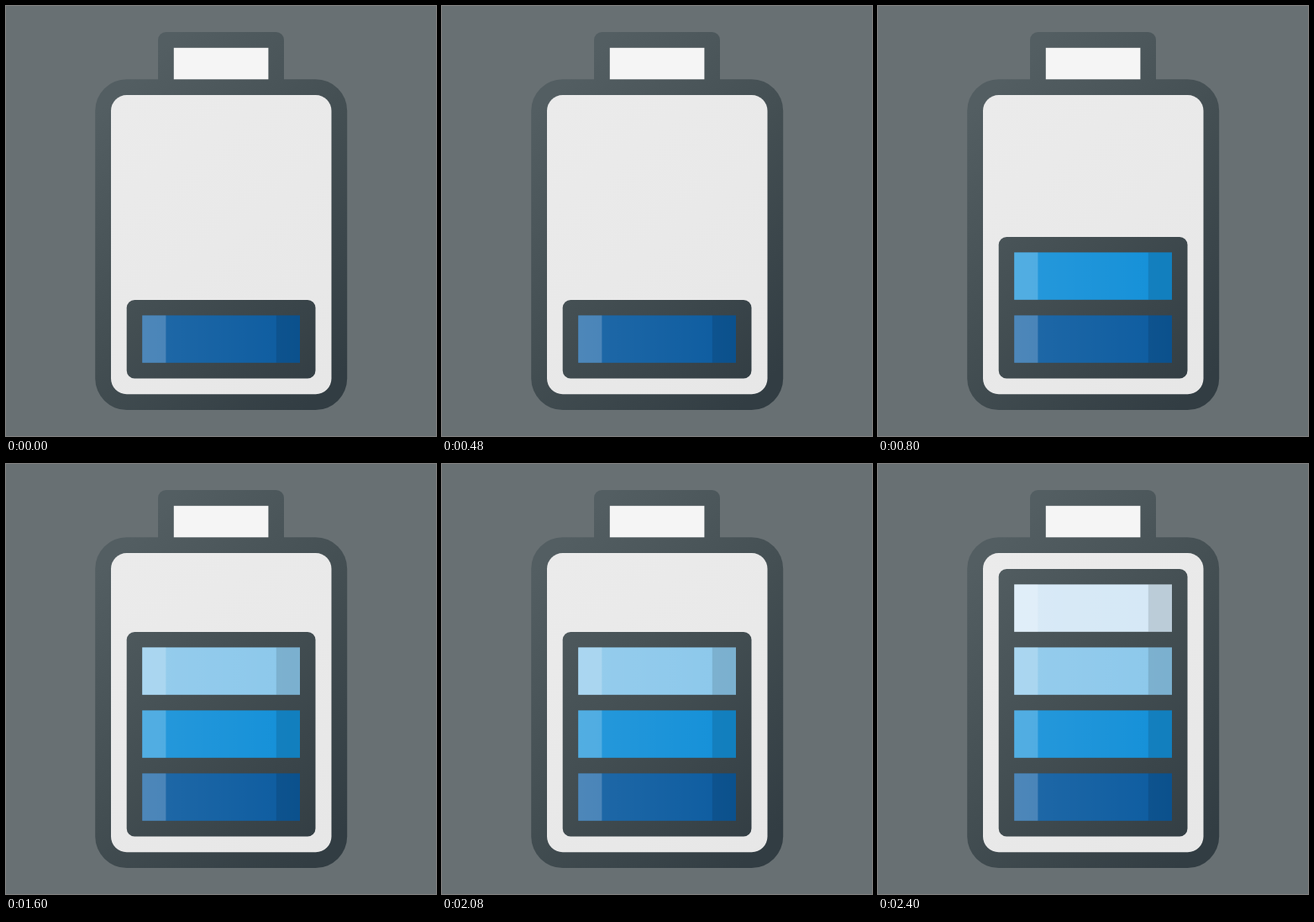
Write an HTML page that moves like this. It is 512 px wide and 512 px high and loops after 3200 ms.

```html
<!DOCTYPE html>
<html lang="en">
<head>
<meta charset="utf-8">
<title>Charging battery</title>
<style>
html, body { margin: 0; width: 100%; height: 100%; overflow: hidden; background: #687073; }
svg { display: block; width: 100vw; height: 100vh; }
</style>
</head>
<body>
<svg viewBox="0 0 512 512">
  <defs>
    <linearGradient id="edge" gradientUnits="userSpaceOnUse" x1="115" y1="120" x2="415" y2="420">
      <stop offset="0" stop-color="#535e62"/>
      <stop offset=".5" stop-color="#434e52"/>
      <stop offset="1" stop-color="#323d43"/>
    </linearGradient>
    <linearGradient id="shell" gradientUnits="userSpaceOnUse" x1="125" y1="106" x2="387" y2="462">
      <stop offset="0" stop-color="#ebebeb"/>
      <stop offset="1" stop-color="#e7e7e7"/>
    </linearGradient>
    <linearGradient id="sheen" x1="0" y1="0" x2="1" y2="0">
      <stop offset="0" stop-color="#fff" stop-opacity=".08"/>
      <stop offset="1" stop-color="#fff" stop-opacity="0"/>
    </linearGradient>
  </defs>
  <rect x="181" y="31" width="150" height="80" rx="9.4" fill="url(#edge)"/>
  <rect x="106.2" y="87.2" width="300" height="393.8" rx="37.5" fill="url(#edge)"/>
  <rect x="199.8" y="49.8" width="112.6" height="37.5" fill="#f5f5f5"/>
  <rect x="125" y="106" width="262.5" height="356.2" rx="18.75" fill="url(#shell)"/>
  <rect id="panel" x="143.7" width="224.8" rx="9.4" fill="url(#edge)"/>
  <g id="cells"></g>
</svg>
<script>
const STEP = 800, PITCH = 75, BOTTOM = 443.5;
const colors = ['#0d5ca0', '#1490d8', '#8cc8eb', '#d5e8f6'];
const panel = document.getElementById('panel');
const group = document.getElementById('cells');

function addRect(parent, attrs) {
  const el = document.createElementNS('http://www.w3.org/2000/svg', 'rect');
  for (const key in attrs) el.setAttribute(key, attrs[key]);
  parent.appendChild(el);
}

const cells = colors.map((fill, i) => {
  const g = document.createElementNS('http://www.w3.org/2000/svg', 'g');
  const y = 368.4 - i * PITCH, height = 56.4;
  addRect(g, { x: 162.2, y, width: 187.8, height, fill });
  addRect(g, { x: 162.2, y, width: 187.8, height, fill: 'url(#sheen)' });
  addRect(g, { x: 162.2, y, width: 28.2, height, fill: '#fff', 'fill-opacity': .2 });
  addRect(g, { x: 321.8, y, width: 28.2, height, fill: '#000', 'fill-opacity': .12 });
  group.appendChild(g);
  return g;
});

function draw(time) {
  const level = Math.floor(time / STEP) % colors.length + 1;
  const height = level * PITCH + 18.6;
  panel.setAttribute('y', BOTTOM - height);
  panel.setAttribute('height', height);
  cells.forEach((cell, i) => cell.setAttribute('visibility', i < level ? 'visible' : 'hidden'));
}

const start = performance.now();
function tick() {
  draw(performance.now() - start);
  requestAnimationFrame(tick);
}
tick();
</script>
</body>
</html>
```
